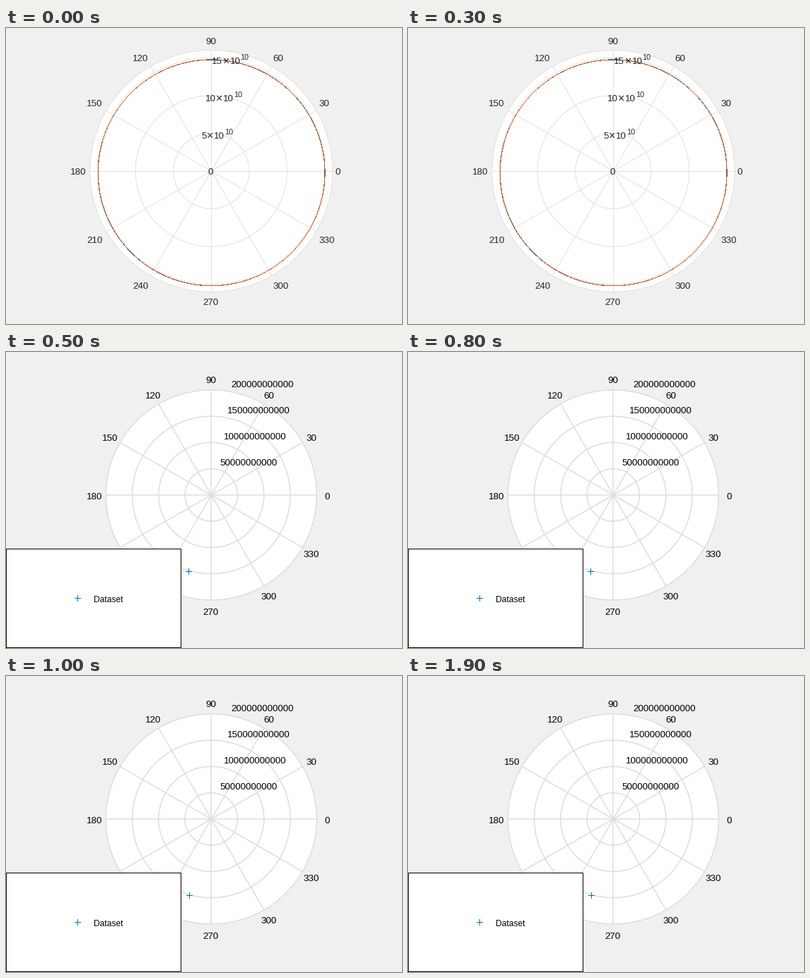
Animation, 560 px wide and 420 px high, one loop 2.5 s. Source, as a matplotlib script:

```python
import numpy as np
import matplotlib.pyplot as plt
from matplotlib.animation import ArtistAnimation
from matplotlib.patches import Circle, Rectangle

W, H, DPI = 560, 420, 100
PX = 72 / DPI  # points per pixel
CX, CY = 290.3, 202.9
BLUE, ORANGE, GRID, INK = "#0072bd", "#d95319", "#dedede", "#262626"

plt.rcParams["font.family"] = "Liberation Sans"
fig = plt.figure(figsize=(W / DPI, H / DPI), dpi=DPI, facecolor="#f0f0f0")
ax = fig.add_axes([0, 0, 1, 1])
ax.set_xlim(0, W)
ax.set_ylim(H, 0)
ax.axis("off")


def text(x, y, s, size=13.33, ha="center", color="black"):
    """Text whose digits are vertically centred on y."""
    return ax.text(x, y + 0.36 * size, s, fontsize=size * PX, ha=ha,
                   va="baseline", color=color, zorder=5)


def line(x, y, color, width=1.0, z=2, cap="butt"):
    return ax.plot(x, y, color=color, lw=width * PX, zorder=z,
                   solid_capstyle=cap)[0]


def ring(r, color, width):
    t = np.linspace(0, 2 * np.pi, 721)
    return line(CX + r * np.cos(t), CY + r * np.sin(t), color, width)


def crisp_ring(x, y, r, color, z):
    """One-pixel circle without antialiasing."""
    k = np.arange(-np.ceil(r * 0.71), np.ceil(r * 0.71) + 1)
    cols, rows = np.floor(x) + k, np.floor(y) + k
    rise = np.sqrt(r**2 - (cols + 0.5 - x)**2)
    run = np.sqrt(r**2 - (rows + 0.5 - y)**2)
    px = np.concatenate([cols, cols, np.floor(x - run), np.floor(x + run)])
    py = np.concatenate([np.floor(y - rise), np.floor(y + rise), rows, rows])
    return ax.hlines(py + 0.5, px, px + 1, colors=color, lw=PX, zorder=z,
                     snap=False, capstyle="butt")


def polar_grid(radius, radii, width):
    parts = [ax.add_patch(Circle((CX, CY), radius, fc="white", ec="none", zorder=1))]
    parts += [ring(r, GRID, width) for r in radii]
    for a in np.radians(np.arange(0, 180, 30)):
        dx, dy = radius * np.cos(a), radius * np.sin(a)
        parts.append(line([CX - dx, CX + dx], [CY + dy, CY - dy], GRID, width))
    return parts


def plus(x, y):
    return [line([x - 4, x + 4], [y, y], BLUE, z=8, cap="projecting"),
            line([x, x], [y - 4, y + 4], BLUE, z=8, cap="projecting")]


def power_label(x, y, mantissa):
    digit = 7.4
    left = x - 27 + digit * (2 - len(mantissa)) / 2
    cross = left + digit * len(mantissa)
    return [text(left, y, mantissa, ha="left", color=INK),
            text(cross + 5.3, y, "×", 16, color=INK),
            text(cross + 10.6, y, "10", ha="left", color=INK),
            text(cross + 25.4, y - 4.8, "10", 10.8, "left", INK)]


def orbit_scene():
    outer = 171.5
    unit = outer / 16
    parts = polar_grid(outer, [5 * unit, 10 * unit, 15 * unit, outer], 0.9)
    parts.append(crisp_ring(290.5, 205.4, 160.4, BLUE, 3))
    parts.append(crisp_ring(290.7, 205.2, 160.4, ORANGE, 4))
    for deg in range(0, 360, 30):
        c, s = np.cos(np.radians(deg)), np.sin(np.radians(deg))
        side, rise = np.sign(round(c, 6)), np.sign(round(s, 6))
        ha = {1: "left", 0: "center", -1: "right"}[int(side)]
        parts.append(text(CX - 0.8 + 176.5 * c, CY + 0.4 - 176.5 * s - 8.6 * rise,
                          str(deg), ha=ha, color=INK))
    tilt = np.radians(80)
    for n in (5, 10, 15):
        r = n * unit
        parts += power_label(CX + r * np.cos(tilt), CY + 1.6 - r * np.sin(tilt), str(n))
    parts.append(text(CX - 1, CY + 0.7, "0", color=INK))
    return parts


def dataset_scene():
    outer = 149
    parts = polar_grid(outer, outer * np.arange(1, 5) / 4, 1.5)
    for deg in range(0, 360, 30):
        if deg in (210, 240):  # covered by the legend
            continue
        a = np.radians(deg)
        parts.append(text(CX - 0.5 + 1.103 * outer * np.cos(a),
                          CY + 0.9 - 1.103 * outer * np.sin(a), str(deg)))
    for k in range(1, 5):
        parts.append(text(297.5 + 5.2 * k, 193.5 - 37.1 * k,
                          str(50_000_000_000 * k), ha="left"))
    parts.append(ax.add_patch(Rectangle((0, 279), 247, 140, fc="white",
                                        ec="black", lw=PX, zorder=6)))
    label = text(124, 351, "Dataset", 12, "left")
    label.set_zorder(8)
    return parts + plus(101, 349) + [label]


orbit = orbit_scene()
data = dataset_scene()
first = data + plus(258, 311)
second = data + plus(259, 311)

anim = ArtistAnimation(fig, [orbit, first, second, second, second],
                       interval=500, repeat=True, repeat_delay=0, blit=False)
plt.show()
```
